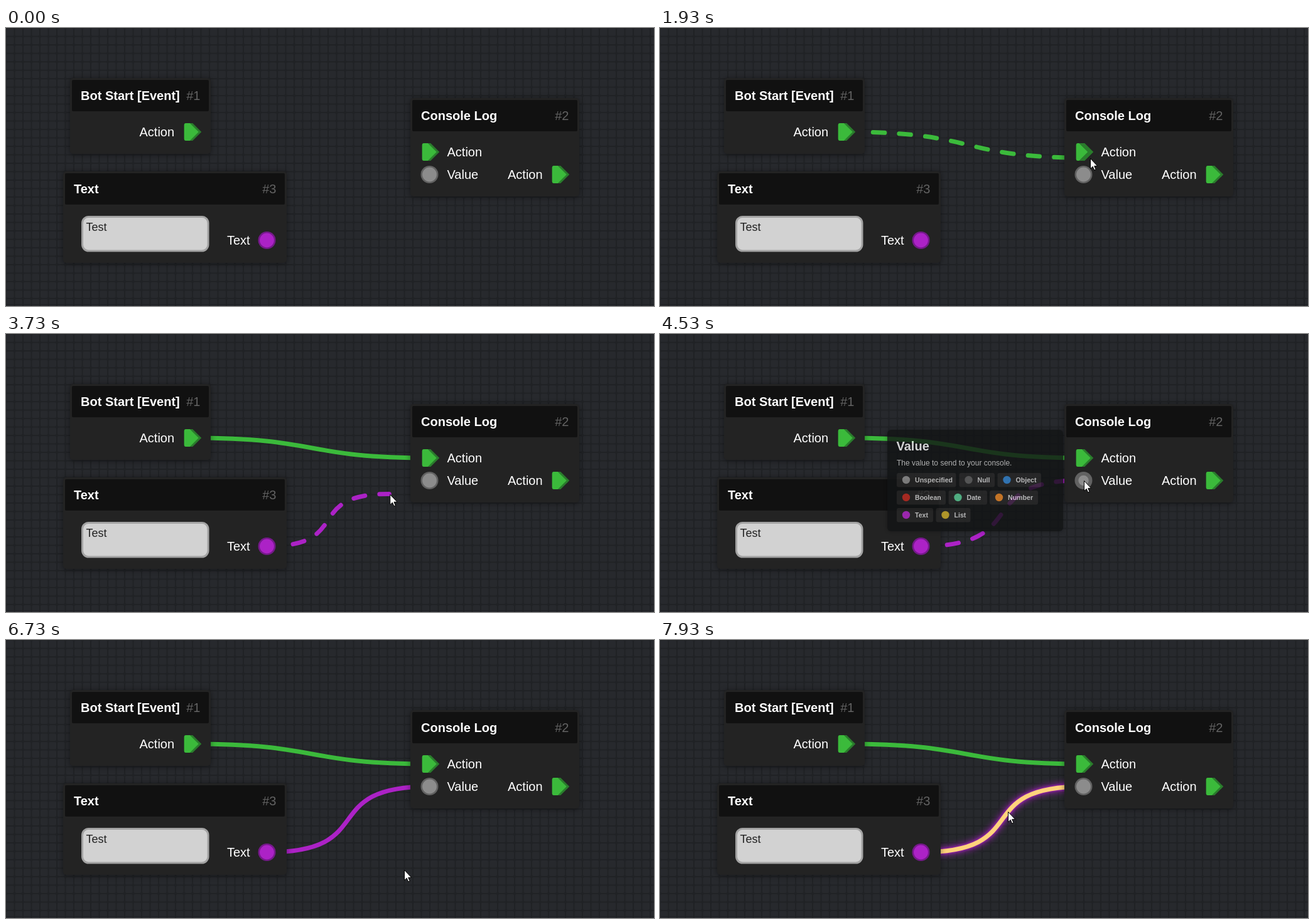
Write an HTML page that moves like this. It is 1032 px wide and 444 px high and loops after 8 s.

```html
<!DOCTYPE html>
<html lang="en">
<head>
<meta charset="utf-8">
<title>Block editor</title>
<style>
html, body { margin: 0; width: 100%; height: 100%; overflow: hidden; background: #26282c; }
svg { display: block; width: 1032px; height: 444px; }
text { font-family: "Liberation Sans", Arial, sans-serif; font-size: 20px; fill: #fff; white-space: pre; }
.b { font-weight: bold; }
.id { fill: #636363; }
.input { font-size: 18px; fill: #222; }
.desc { font-size: 12px; fill: #d2d2d2; }
.chip { font-size: 10.6px; font-weight: bold; fill: #dcdcdc; }
.node { filter: drop-shadow(0 1px 5px rgba(0, 0, 0, .45)); }
.link { fill: none; stroke-width: 7; }
.dashed { stroke-dasharray: 18.5 23.2; stroke-linecap: round; }
</style>
</head>
<body>
<svg id="stage" width="1032" height="444" viewBox="0 0 1032 444"></svg>
<script>
const GREEN = '#3bba3b', DARK_GREEN = '#2a7c2c';
const PURPLE = '#ac22c6', DARK_PURPLE = '#75198a';
const STEP = 1000 / 15, LOOP = 8000;

const label = (x, y, s, cls = '') => `<text x="${x}" y="${y}" class="${cls}">${s}</text>`;
const rect = (x, y, w, h, r, fill, more = '') =>
  `<rect x="${x}" y="${y}" width="${w}" height="${h}" rx="${r}" fill="${fill}" ${more}/>`;

// Arrow pointing right, with its tip 'cut' pixels short of full size.
const arrow = (x, y, cut) => {
  const s = x + 13.5 - cut;
  return `M${x + 3} ${y - 14}H${s}L${x + 27.5 - cut} ${y}L${s} ${y + 14}H${x + 3}` +
    `Q${x} ${y + 14} ${x} ${y + 11}V${y - 11}Q${x} ${y - 14} ${x + 3} ${y - 14}Z`;
};

const pins = [
  { x: 297.5, y: 166, kind: 'arrow' },
  { x: 676.5, y: 198, kind: 'arrow' },
  { x: 883.5, y: 234, kind: 'arrow' },
  { x: 674.5, y: 234, fill: '#8c8c8c', edge: '#626262' },
  { x: 415.5, y: 339, fill: PURPLE, edge: DARK_PURPLE }
];

const pinMarkup = (p, i) => p.kind
  ? `<path d="${arrow(p.x - 13.75, p.y, 0)}" fill="${DARK_GREEN}"/><path id="pin${i}" fill="${GREEN}"/>`
  : `<circle cx="${p.x}" cy="${p.y}" r="14" fill="${p.edge}"/>` +
    `<circle id="pin${i}" cx="${p.x}" cy="${p.y}" fill="${p.fill}"/>`;

const node = (x, y, w, h, title, id) => `<g class="node">${rect(x, y, w, h, 5, '#232323')}</g>` +
  rect(x + 3, y + 3, w - 6, 50, 2, '#111') +
  label(x + 17, y + 35, title, 'b') +
  `<text x="${x + w - 16.5}" y="${y + 35}" text-anchor="end" class="id">${id}</text>`;

const chip = ([x, y, w, color, s]) => rect(x, y, w, 22.5, 3, '#272727') +
  `<circle cx="${x + 15}" cy="${y + 11}" r="6.2" fill="${color}"/>` + label(x + 29, y + 15, s, 'chip');

const tip = (id, x, y, w, h, title, desc, chips) => `<g id="${id}">` +
  rect(x, y, w, h, 6, '#121415', 'style="filter:drop-shadow(0 0 3px rgba(0,0,0,.4))"') +
  label(x + 14.5, y + 33, title, 'b') + label(x + 15, y + 57, desc, 'desc') +
  chips.map(chip).join('') + '</g>';

const stage = document.getElementById('stage');
stage.innerHTML = `
<defs><pattern id="grid" width="13.5" height="13.5" patternUnits="userSpaceOnUse">
  <rect width="13.5" height="13.5" fill="#202225"/>
  <rect x="1" y="1" width="11.5" height="11.5" rx="2" fill="#27292d"/>
</pattern></defs>
<rect width="1032" height="444" fill="url(#grid)"/>
<rect y="441" width="1032" height="1" fill="#1e2023"/>
<path id="link0" class="link" stroke="${GREEN}"/>
<path id="link1" class="link"/>` +
  node(102, 80, 224, 121, 'Bot Start [Event]', '#1') + label(212.5, 173, 'Action') +
  node(644, 112, 269, 157, 'Console Log', '#2') +
  label(702.5, 205, 'Action') + label(702.5, 241, 'Value') + label(799, 241, 'Action') +
  node(91, 229, 356, 146, 'Text', '#3') + label(352, 346, 'Text') +
  rect(121.5, 301.5, 200.5, 54.5, 10, '#d2d2d2', 'stroke="#a3a3a3" stroke-width="3"') +
  label(127.5, 324, 'Test', 'input') +
  pins.map(pinMarkup).join('') +
  tip('tip0', 502, 145, 140, 106, 'Action', 'Executes this block.', [[517, 214, 68, GREEN, 'Action']]) +
  tip('tip1', 362, 153, 280, 162, 'Value', 'The value to send to your console.', [
    [377, 222, 94.5, '#959595', 'Unspecified'], [476.5, 222, 56.5, '#606060', 'Null'],
    [537.5, 222, 69.5, '#3486d2', 'Object'], [377, 250, 78, '#cb3026', 'Boolean'],
    [459.5, 250, 61.5, '#5bcf97', 'Date'], [525, 250, 77, '#ea8726', 'Number'],
    [377, 278, 58, '#b928d0', 'Text'], [439.5, 278, 55, '#d3b22a', 'List']
  ]) +
  `<path id="cursor" d="M0 0V16.3L3.7 12.8L6.2 18.6L8.6 17.6L6.2 11.9H11.2Z"
    fill="#fff" stroke="#000" stroke-width="1" stroke-linejoin="round"/>`;

const el = id => document.getElementById(id);
const clamp = v => Math.max(0, Math.min(1, v));
const inOut = p => p * p * (3 - 2 * p);
const easeIn = p => p * p;
const easeOut = p => 1 - (1 - p) ** 2;
const start = p => p ** 1.2;

// time, x, y, easing used to get there
const path = [
  [133, 1024, 434],
  [933, 300, 168, inOut],
  [1400, 568, 206, start],
  [1800, 679, 211, easeOut],
  [1933, 685, 208],
  [2267, 685, 208],
  [2467, 640, 245, easeIn],
  [3000, 427, 345, easeOut],
  [3267, 427, 345],
  [3733, 611, 256, start],
  [4133, 674, 235, easeOut],
  [4267, 675, 234],
  [4800, 675, 234],
  [5133, 634, 359, inOut],
  [5400, 634, 359],
  [5467, 632, 360],
  [6667, 632, 360],
  [6733, 634, 367],
  [6800, 634, 367],
  [7133, 554, 273, inOut],
  [7200, 554, 273],
  [7267, 554, 274]
];

function cursorAt(t) {
  const i = path.findIndex(k => k[0] > t);
  if (i < 0) return path[path.length - 1].slice(1, 3);
  if (i === 0) return path[0].slice(1, 3);
  const a = path[i - 1], b = path[i];
  const raw = (t - a[0]) / (b[0] - a[0]);
  const p = b[3] ? b[3](raw) : raw;
  return [a[1] + (b[1] - a[1]) * p, a[2] + (b[2] - a[2]) * p];
}

const hit = (p, t) => {
  if (t < 130) return 0;
  const [x, y] = cursorAt(t);
  return Math.hypot(x - p.x, y - p.y) < 14.5 ? 1 : 0;
};

function curve(a, bx, by) {
  const c = (Math.abs(bx - a.x) + Math.abs(by - a.y)) / 2;
  return `M${a.x} ${a.y}C${a.x + c} ${a.y} ${bx - c} ${by} ${bx} ${by}`;
}

function drawLink(id, from, to, t, grab, drop, [cx, cy]) {
  const link = el(id), held = t < drop;
  link.style.display = t < grab ? 'none' : '';
  link.classList.toggle('dashed', held);
  link.setAttribute('d', held ? curve(from, cx - 1, cy - 0.5) : curve(from, to.x, to.y));
}

function fadeTip(id, n, show, hide) {
  const o = n < show ? 0 : n < hide ? Math.min(1, 0.8 + (n - show) * 0.1) : clamp(0.75 - (n - hide) * 0.35);
  el(id).style.opacity = o;
  el(id).style.display = o ? '' : 'none';
}

function mix(a, b, p) {
  return `rgb(${a.map((v, i) => Math.round(v + (b[i] - v) * p))})`;
}

function draw(ms) {
  const n = Math.floor((ms + 5) / STEP + 0.001), t = n * STEP + 0.5;
  const pos = cursorAt(t);

  el('cursor').style.display = n < 2 ? 'none' : '';
  el('cursor').setAttribute('transform', `translate(${pos[0] + 0.5} ${pos[1] + 0.5})`);

  pins.forEach((p, i) => {
    const h = (hit(p, t) + hit(p, t - STEP) + hit(p, t - 2 * STEP)) / 3;
    if (p.kind) el('pin' + i).setAttribute('d', arrow(p.x - 13.75, p.y, 4.5 + 4.5 * h));
    else el('pin' + i).setAttribute('r', 11.4 - 3.2 * h);
  });

  drawLink('link0', pins[0], pins[1], t, 1000, 2266, pos);
  drawLink('link1', pins[4], pins[3], t, 3333, 4666, pos);
  fadeTip('tip0', n, 33, 35);
  fadeTip('tip1', n, 68, 73);

  const glow = inOut(clamp((t - 7400) / 533));
  el('link1').style.stroke = mix([172, 34, 198], [255, 211, 124], glow);
  el('link1').style.filter = glow
    ? `drop-shadow(0 0 ${2 * glow}px rgba(176,32,204,${glow})) drop-shadow(0 0 ${6 * glow}px rgba(176,32,204,${glow}))`
    : 'none';
}

const t0 = performance.now();
function tick() {
  draw((performance.now() - t0) % LOOP);
  requestAnimationFrame(tick);
}
draw(0);
requestAnimationFrame(tick);
</script>
</body>
</html>
```
